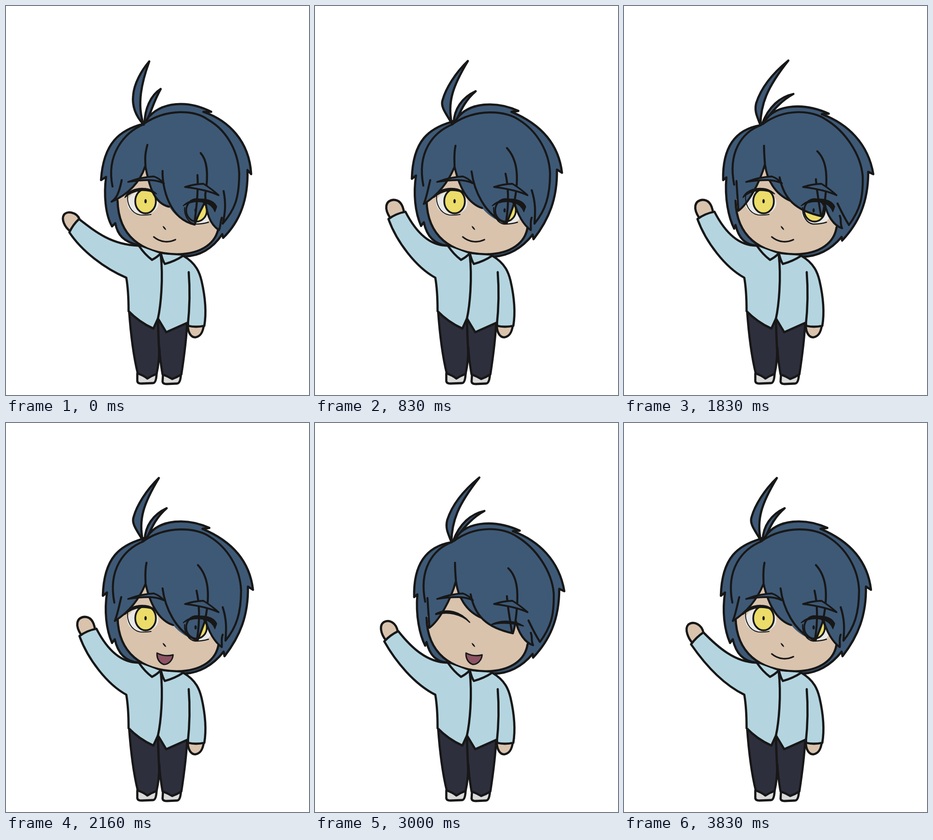
Recreate the animation shown at these times as an HTML page with a canvas. Size 660 by 849 pixels, loop 4.05 s.

```html
<!DOCTYPE html>
<html lang="en">
<head>
<meta charset="utf-8">
<title>Waving</title>
<style>
html, body { margin: 0; width: 100%; height: 100%; overflow: hidden; background: #fff; }
canvas { display: block; width: 660px; height: 849px; }
</style>
</head>
<body>
<canvas id="stage" width="660" height="849"></canvas>
<script>
const ctx = document.getElementById('stage').getContext('2d');
const INK = '#171717', HAIR = '#3e5976', SKIN = '#d9c3ad', SHIRT = '#b4d5e0',
      PANTS = '#2e2f3d', SHOE = '#d9d9d9', WHITE = '#e8e8e6', IRIS = '#ecdc6a', MOUTH = '#8c5363';
const LOOP = 4050, LAST = 23;

// Key poses per step: hair sway 0..2, arm lift 0..3
const sway = [0, 1, 1.6, 2, 1.6, 1, 0, 0, 1, 1, 1.6, 2, 1.6, 1, 0, 1, 1.6, 2, 2, 1.6, 1, 0, 1, 1];
const lift = [0, 1, 1.35, 2, 3, 2, 1.35, 1];
const eyesShut = i => i === 9 || (i >= 18 && i < 22);
const mouthOpen = i => i >= 13 && i < 22;

// Each hair part: left, middle and right sway
const hair = {
  back: [
    'M300 257C248 270 212 299 207 380L218 373C213 410 216 455 231 481L238 474C243 500 256 514 288 522L388 546C420 547 450 530 471 498L473 506C505 475 528 430 526 358L534 367C530 295 485 250 430 231L447 231C398 206 338 206 306 248Z',
    'M297 253C250 267 213 292 211 377L220 370C214 410 218 450 231 480L237 472C243 500 258 520 288 523L390 547C420 545 450 530 474 499L476 509C510 465 528 420 527 357L538 364C530 295 485 255 428 231L443 229C395 207 335 209 308 247Z',
    'M298 260C250 268 214 300 216 380L223 374C219 420 228 462 240 486L243 478C248 500 260 521 288 523L390 547C420 547 450 533 474 504L475 512C510 475 532 430 532 362L543 367C532 300 487 257 431 236L446 235C395 212 335 212 306 250Z'],
  bangs: [
    'M252 380C246 410 240 420 230 427C265 412 292 385 303 350C310 380 318 430 355 438C372 463 392 474 411 477C418 455 428 440 435 424C437 460 448 478 464 489L474 404L420 290L280 290Z',
    'M251 380C246 400 243 418 237 432C272 410 292 380 304 351C313 390 330 430 364 441C380 460 398 470 417 475C424 458 429 445 434 430C441 455 454 478 470 489L472 402L420 290L280 290Z',
    'M245 382C246 400 248 425 249 447C270 432 296 386 307 345C311 378 328 410 362 425C384 445 405 455 431 459C434 450 436 440 437 430C442 458 458 480 475 485L470 430L420 290L280 290Z'],
  lines: [
    'M300 258C256 277 218 325 232 394M302 256C350 224 410 226 440 248C475 268 505 309 508 365C508 420 498 445 472 475C478 450 479 430 474 404M252 380C246 410 240 420 230 427C265 412 292 385 303 350M308 303C302 325 303 335 304 352C310 380 318 430 355 438M341 360C340 395 355 465 411 477C418 455 428 440 435 424M424 321C437 335 442 365 434 412C435 455 446 478 464 489C468 480 466 474 470 462M417 369C419 400 416 430 411 470',
    'M300 258C256 276 222 320 236 392M302 256C350 224 415 227 445 249C482 272 510 316 512 365C512 415 502 446 478 475C480 450 481 430 472 402M251 380C246 400 243 418 237 432C272 410 292 380 304 351M306 305C302 325 304 340 304 351C313 390 330 430 364 441M341 361C346 400 368 455 417 475C424 458 429 445 434 430M418 310C439 333 446 368 434 428C441 455 454 478 470 489C471 480 468 472 472 462M415 366C421 392 423 430 416 472',
    'M298 260C256 276 226 320 240 390M302 258C350 222 410 227 440 248C480 272 516 322 520 372C521 420 514 445 490 478C480 462 474 450 465 431M245 382C246 400 248 425 249 447C270 432 296 386 307 345M305 305C305 320 306 332 307 345C311 378 328 410 362 425M339 374C348 420 372 446 431 459C434 450 436 440 437 430M421 317C443 338 444 375 437 430C442 458 458 480 475 485C470 474 474 466 470 458M418 378C420 405 425 430 429 458'],
  tall: [
    'M312 121C294 142 279 170 277 195C274 222 286 244 300 259C284 215 296 165 312 121Z',
    'M333 120C305 147 285 180 278 205C272 222 290 240 298 257C288 210 300 175 333 120Z',
    'M358 119C320 150 298 180 288 212C283 232 292 244 297 260C298 215 310 180 358 119Z'],
  small: [
    'M337 181C315 195 302 225 302 256C314 242 318 215 337 181Z',
    'M350 186C320 200 303 225 302 256C314 246 316 216 350 186Z',
    'M369 192C340 198 315 220 301 257C313 246 332 212 369 192Z']
};

// Hand, then sleeve, from lowest to highest lift
const hands = [
  'M160 465C154 450 133 446 126 456C120 466 128 482 139 491',
  'M173 458C170 440 152 431 140 440C131 450 140 470 149 480',
  'M194 451C191 430 182 423 171 423C153 425 150 442 164 463',
  'M204 444C201 425 193 417 182 416C163 418 160 436 169 456'];
const sleeves = [
  'M262 593C215 573 165 535 138 494Q146 477 159 465C195 493 230 521 288 523',
  'M262 593C215 570 175 525 146 483Q158 467 173 457C205 490 242 522 288 523',
  'M262 593C220 570 178 515 160 465Q176 453 197 449C218 490 247 523 288 523',
  'M262 593C220 568 184 508 166 459Q184 447 207 444C218 485 243 523 288 523'];

function blend(poses, at) {
  const n = Math.min(Math.floor(at), poses.length - 2), k = at - n;
  const next = poses[n + 1].match(/[\d.]+/g);
  let j = 0;
  return poses[n].replace(/[\d.]+/g, a => +a + (next[j++] - a) * k + ' ');
}

function draw(d, fill, width = 4.8) {
  const p = new Path2D(d);
  if (fill) { ctx.fillStyle = fill; ctx.fill(p); }
  if (width) { ctx.lineWidth = width; ctx.stroke(p); }
}

function oval(x, y, rx, ry, fill, width = 0) {
  ctx.beginPath();
  ctx.ellipse(x, y, rx, ry, 0, 0, 7);
  if (fill) { ctx.fillStyle = fill; ctx.fill(); }
  if (width) { ctx.lineWidth = width; ctx.stroke(); }
}

function body(up) {
  draw('M286 802L286 819Q287 824 295 824L320 823Q327 823 328 803Z', SHOE);
  draw('M342 804L341 820Q342 825 350 825L372 824Q380 824 381 804Z', SHOE);
  draw('M268 664C272 720 278 765 287 802Q299 806 308 813Q317 807 328 803C333 780 334 760 334 745C335 770 338 785 341 804Q352 808 362 814Q373 810 382 804C388 765 393 730 395 685Z', PANTS);
  draw('M331 690Q332 725 334 762', null, 5);
  draw('M396 696C396 714 404 724 413 723C424 721 429 712 431 696', SKIN);
  draw(blend(hands, up), SKIN);
  const sleeve = blend(sleeves, up);
  draw(sleeve + 'L386 545C415 562 422 583 426 600C434 635 437 668 432 698Q413 702 397 698L396 691L349 712L331 682L321 704Q290 690 267 666C267 635 265 610 262 593Z', SHIRT);
  draw('M337 542C343 595 337 655 331 682M398 581C401 620 400 660 396 697');
}

function openEyes() {
  oval(298, 430, 34, 26, WHITE);
  oval(304, 426, 23, 27, IRIS);
  oval(419, 450, 32, 26, WHITE);
  oval(415, 446, 23, 25, IRIS);
}

function eyeLines(shut) {
  if (shut) {
    draw('M263 416C288 403 318 412 337 435C318 417 290 411 263 418Z', INK, 2.5);
    draw('M382 441C405 428 436 431 454 443C434 438 405 434 382 441Z', INK, 2.5);
    return;
  }
  oval(304, 426, 22.5, 26.5, null, 3.8);
  oval(304, 426, 2.5, 4.5, INK);
  draw('M259 418C268 396 308 390 328 410C306 399 280 400 259 418Z', INK, 2);
  draw('M265 412C263 432 272 452 292 456Q304 457 316 455', null, 2);
  oval(415, 446, 22.5, 24.5, null, 3.8);
  oval(413, 446, 2.5, 4.5, INK);
  draw('M386 436C402 418 448 414 459 438L455 449C446 425 412 421 386 436Z', INK, 2);
  draw('M389 440C388 458 398 474 412 476Q428 476 441 472', null, 2.5);
}

function face(open) {
  draw('M243 425C245 502 295 540 372 542C430 541 458 515 463 483L466 440L440 390L305 330L268 380Z', SKIN, 0);
  draw('M243 425C245 502 295 540 372 542C430 541 458 515 463 483');
  draw('M290 524Q302 542 318 554Q328 549 336 541', SHIRT);
  draw('M338 542Q341 555 346 563Q368 557 386 545', SHIRT);
  draw('M342 481Q346 483 348 488Q344 486 342 481Z', INK, 1.5);
  if (open) draw('M329 502Q346 511 364 506C363 518 354 527 344 527C334 524 328 514 329 502Z', MOUTH, 3);
  else draw('M322 504C336 516 354 517 369 510', null, 3.5);
}

function render(i) {
  const s = sway[i], shut = eyesShut(i);
  ctx.fillStyle = '#fff';
  ctx.fillRect(0, 0, 660, 849);
  ctx.strokeStyle = INK;
  ctx.lineCap = ctx.lineJoin = 'round';
  draw(blend(hair.back, s), HAIR);
  body(lift[i % 8]);
  face(mouthOpen(i));
  if (!shut) openEyes();
  draw(blend(hair.bangs, s), HAIR, 0);
  draw(blend(hair.lines, s), null, 4.4);
  draw(blend(hair.tall, s), HAIR);
  draw(blend(hair.small, s), HAIR);
  eyeLines(shut);
  draw('M266 384Q296 373 322 372Q334 376 344 387Q329 380 312 380Q288 380 266 384Z', HAIR, 3.8);
  draw('M390 395Q408 389 430 388Q448 399 463 413Q438 401 390 395Z', HAIR, 3.8);
}

// Six steps a second, starts cut to whole hundredths
function stepAt(ms) {
  const t = Math.floor((ms % LOOP) / 10);
  return Math.min(LAST, Math.ceil((t + 1) * 6 / 100) - 1);
}

const start = performance.now();
function tick() {
  render(stepAt(performance.now() - start));
  requestAnimationFrame(tick);
}
tick();
</script>
</body>
</html>
```
